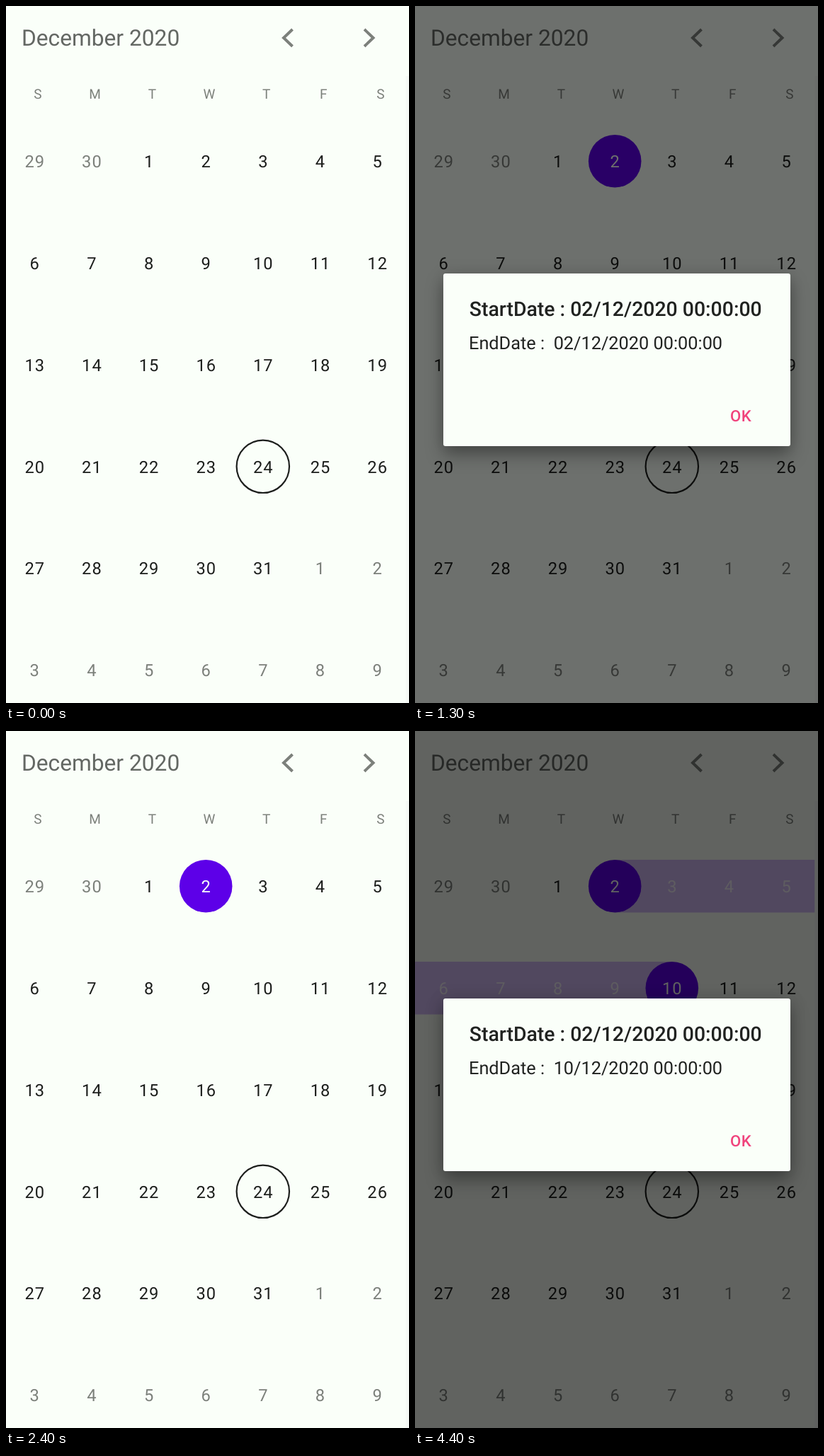
Animation, 569 px wide and 985 px high, one loop 4.5 s. Source, as an HTML page:

```html
<!DOCTYPE html>
<html lang="en">
<head>
<meta charset="utf-8">
<title>Date range picker</title>
<style>
  html, body { margin: 0; width: 100%; height: 100%; overflow: hidden; background: #fafff9; }
  svg { position: absolute; left: 0; top: 0; font-family: Roboto, sans-serif; text-rendering: geometricPrecision; }
  .day { font-size: 23.7px; letter-spacing: 1px; text-anchor: middle; fill: #1c1e1c; }
  .weekday { font-size: 19px; text-anchor: middle; }
  .weekday, .outside { fill: #7c807b; }
  .within { fill: #f3eff8; }
  .picked { fill: #fafff9; }
  #shade { position: absolute; inset: 0; background: #000; }
  #dialog {
    position: absolute; left: 39.5px; top: 378px; width: 490px; height: 244px;
    border-radius: 3px; background: #fafff9;
    box-shadow: 0 12px 24px rgba(0, 0, 0, .34), 0 0 24px rgba(0, 0, 0, .1);
  }
  #dialog svg { left: -39.5px; top: -378px; }
</style>
</head>
<body>
<svg width="569" height="985">
  <rect x="564.5" y="99" width="5" height="886" fill="#f5f9f5"/>
  <text x="22" y="56" font-size="31.7" fill="#636763">December 2020</text>
  <path d="M404.5 33L392 45L404.5 57M506 33L518.5 45L506 57" fill="none" stroke="#7c807b" stroke-width="4"/>
  <g id="range" fill="#d1baf6">
    <rect x="282" y="182" width="282.3" height="74.5"/>
    <rect y="326" width="362.5" height="74.5"/>
  </g>
  <g fill="#5d00e8">
    <circle id="start" cx="282.2" cy="219.2" r="37.3"/>
    <circle id="end" cx="362.8" cy="363.2" r="37.3"/>
  </g>
  <circle cx="362.8" cy="650.8" r="37.2" fill="none" stroke="#1c1e1c" stroke-width="2.2"/>
  <g id="labels"></g>
</svg>
<div id="shade"></div>
<div id="dialog">
  <svg width="569" height="985" fill="#202220">
    <text x="76.8" y="437.5" font-size="28.4" font-weight="500">StartDate : 02/12/2020 00:00:00</text>
    <text x="76" y="485" font-size="25.3" xml:space="preserve">EndDate :  <tspan id="endDay">02</tspan>/12/2020 00:00:00</text>
    <text x="445" y="587" font-size="22.1" font-weight="500" letter-spacing=".6" fill="#f0437c">OK</text>
  </svg>
</div>
<script>
const LOOP = 4500, CELL = 80.66, ROW = 143.85;
const START_TAP = 1000, END_TAP = 3700;
const $ = id => document.getElementById(id);
const clamp = x => Math.min(1, Math.max(0, x));

function addLabel(text, x, y, className) {
  const label = document.createElementNS('http://www.w3.org/2000/svg', 'text');
  label.textContent = text;
  label.setAttribute('x', x);
  label.setAttribute('y', y);
  label.setAttribute('class', className);
  $('labels').append(label);
  return label;
}

[...'SMTWTFS'].forEach((name, i) => addLabel(name, 45 + CELL * i, 131.3, 'weekday'));

// The grid opens on 29 November; December days are 1 to 31.
const days = Array.from({ length: 42 }, (_, i) => {
  const day = i - 1;
  const shown = day < 1 ? day + 30 : day > 31 ? day - 31 : day;
  const x = CELL * (i % 7 + .5) + .4, y = 228 + ROW * Math.floor(i / 7);
  const base = day < 1 || day > 31 ? 'day outside' : 'day';
  return { day, base, label: addLabel(shown, x, y, base) };
});

const fadeAlpha = ms => 1 - (1 - clamp(ms / 220)) ** 2;
const fadeShade = ms => clamp((ms - 20) / 215);

// Opens at 1083, closes at 2030, opens again at 3850.
const dialogLevel = (t, fade) => fade(t - 1083) - fade(t - 2030) + fade(t - 3850);

function dayClass({ day, base }, hasStart, hasRange) {
  if (hasStart && day === 2 || hasRange && day === 10) return 'day picked';
  return hasRange && day > 2 && day < 10 ? 'day within' : base;
}

function draw(now) {
  const t = now % LOOP;
  const hasStart = t >= START_TAP, hasRange = t >= END_TAP;
  $('start').style.display = hasStart ? '' : 'none';
  $('end').style.display = $('range').style.display = hasRange ? '' : 'none';
  for (const item of days) item.label.setAttribute('class', dayClass(item, hasStart, hasRange));
  $('endDay').textContent = hasRange ? '10' : '02';
  $('shade').style.opacity = .61 * dialogLevel(t, fadeShade);
  $('dialog').style.opacity = dialogLevel(t, fadeAlpha);
}

const origin = performance.now();
function tick() {
  draw(performance.now() - origin);
  requestAnimationFrame(tick);
}
tick();
</script>
</body>
</html>
```
